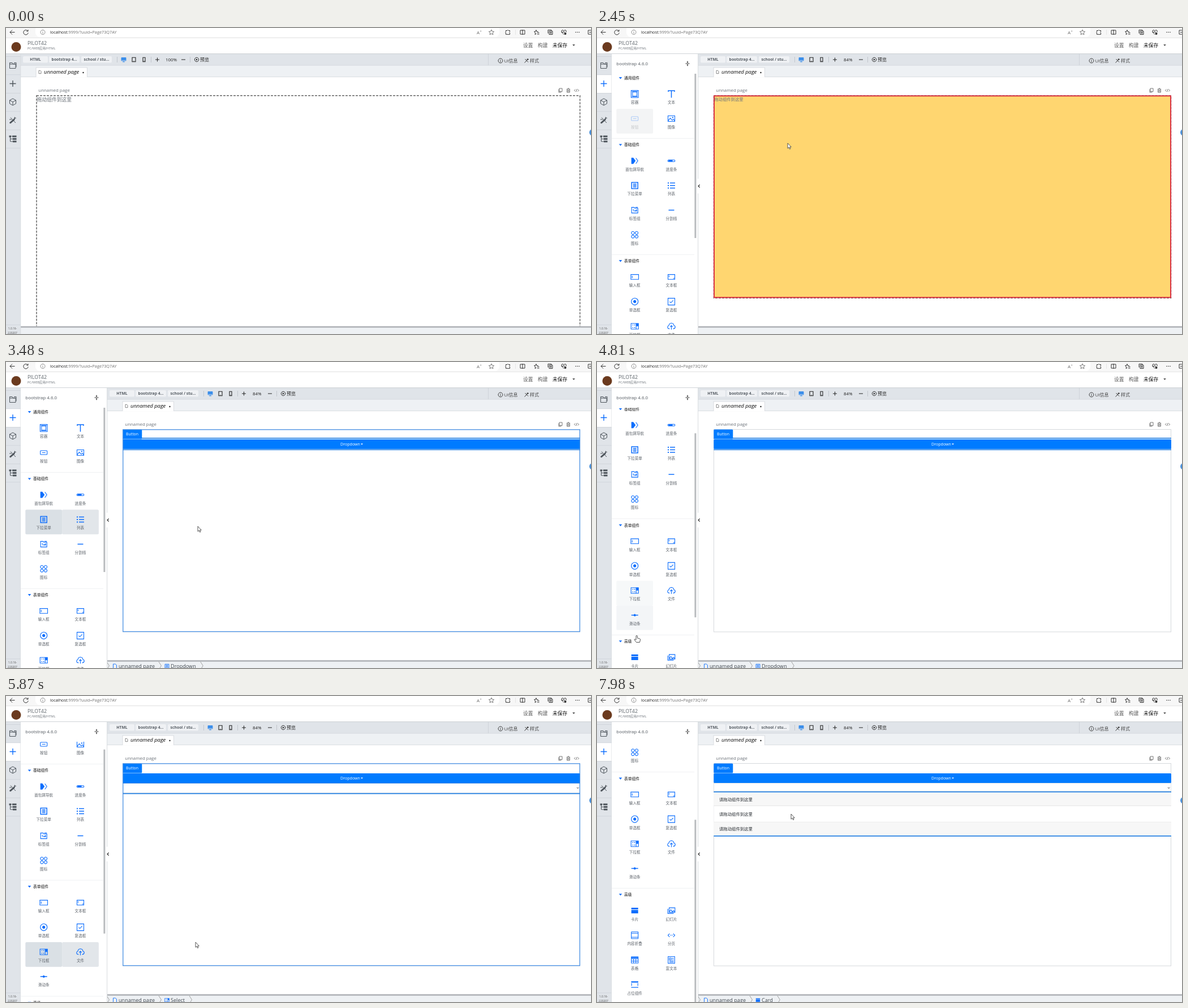
These frames come from a looping animation (1034 px wide and 542 px high, 8000 ms). An HTML page with a canvas:

```html
<!DOCTYPE html>
<html lang="zh-CN">
<head>
<meta charset="utf-8">
<style>
html, body { margin: 0; width: 100%; height: 100%; overflow: hidden; background: #fff; }
canvas { display: block; }
</style>
</head>
<body>
<canvas id="stage" width="1034" height="542"></canvas>
<script>
const c = document.getElementById('stage').getContext('2d');
const LOOP = 8000, OPEN = 1400;
const BLUE = '#0d6efd', BTN = '#007bff', SELECT = '#2f86e4', GREY = '#6b7178', DARK = '#24292e';
const FONT = '"Open Sans", "Noto Sans CJK SC", "Noto Sans CJK", sans-serif';

// Icons: [stroke path, fill path], centred on 0,0
const ICONS = {
  box: ['M-6.3-6.3H6.3V6.3H-6.3ZM-3.8-3.8H3.8V3.8H-3.8Z', 'M-5-5H5V-4H-5ZM-5 4H5V5H-5Z'],
  text: ['M-5.5-4V-6H5.5V-4M0-6V6.5', ''],
  button: ['M-5-3.5H5Q6-3.5 6-2.5V2.5Q6 3.5 5 3.5H-5Q-6 3.5-6 2.5V-2.5Q-6-3.5-5-3.5ZM-3 0H3', ''],
  image: ['M-6-5H6V5H-6ZM-6 4L-2-1L1.5 3L3.5 1L6 4', 'M1.5-3H3.5V-1H1.5Z'],
  crumb: ['M2-5L5.5 0L2 5', 'M-6-5.5H-2.5L1.5 0L-2.5 5.5H-6Z'],
  progress: ['M-5-1.5H5Q6.3-1.5 6.3 0T5 1.5H-5Q-6.3 1.5-6.3 0T-5-1.5', 'M-5-1.5H2V1.5H-5Z'],
  menu: ['M-5.5-5.5H5.5V5.5H-5.5ZM-3-2.5H3M-3 0H3M-3 2.5H3', ''],
  list: ['M-2.5-4.5H6.5M-2.5 0H6.5M-2.5 4.5H6.5', 'M-6.5-5.5H-4.5V-3.5H-6.5ZM-6.5-1H-4.5V1H-6.5ZM-6.5 3.5H-4.5V5.5H-6.5Z'],
  tabs: ['M-5.5-5H-1L0-3.3H5.5V5H-5.5ZM1-5H5.5', 'M-3.7-1.2H-1V-.4H-3.7ZM-2.7-1.2H-1.9V2.5H-2.7ZM-.4.2H1.4V2.5H-.4ZM2-1.2H3.8V2.5H2Z'],
  rule: ['M-5 0H5', ''],
  icons: ['M-.7-3.3A2.6 2.6 0 1 1-.7-3.4ZM5.9-3.3A2.6 2.6 0 1 1 5.9-3.4ZM-.7 3.3A2.6 2.6 0 1 1-.7 3.2ZM5.9 3.3A2.6 2.6 0 1 1 5.9 3.2Z', ''],
  input: ['M-6.8-4.3H6.8V4.3H-6.8ZM-4.5-2V2', ''],
  area: ['M-6-4.3H6V4.3H-6ZM-4-2.3V0', 'M5 1V3.3H2.7Z'],
  radio: ['M6 0A6 6 0 1 1 6-.1Z', 'M2.7 0A2.7 2.7 0 1 1 2.7-.1Z'],
  check: ['M-6-6H6V6H-6ZM-3 0L-1 2.2L3.2-2.2', ''],
  select: ['M-6.5-5H6.5V5H-6.5ZM2.5-5V5M-4.5-2.2H-2.8M-1.5-2.2H1M-4.5 2.2H-2.8M-1.5 2.2H1', 'M2.5-5H6.5V0H2.5Z'],
  upload: ['M-3 4.5H-4Q-7 4-6.6 1Q-6-1-4.5-1.2Q-4-5.3 0-5.5Q4-5.3 4.5-1.2Q7-.7 6.7 2Q6 4.5 3 4.5M0 6V-1M-2.3 1.2L0-1.2L2.3 1.2', ''],
  slider: ['M-6 0H6', 'M2 0A2 2 0 1 1 2-.1Z'],
  card: ['', 'M-6-5H6V-2H-6ZM-6-1H6V5H-6Z'],
  slides: ['M-4-5H6.3V3H-4ZM-4 2L-1-1.5L2 2L4 0L6 2M-6.3-3V5H4', ''],
  fold: ['M-6-6H6M-6 6H6M-6-3.5H6V3.5H-6ZM-6-6V6M6-6V6', ''],
  pages: ['M-3.2-3L-6 0L-3.2 3M3.2-3L6 0L3.2 3', 'M-2.5-.6H-1.3V.6H-2.5ZM-.6-.6H.6V.6H-.6ZM1.3-.6H2.5V.6H1.3Z'],
  table: ['M-6-5.5H6V5.5H-6ZM-6-2H6M-6 2H6M-2-2V5.5M2-2V5.5', 'M-6-5.5H6V-3H-6Z'],
  rich: ['M-5.8-6H5.8V6H-5.8ZM-3.5-3.5H-.5V0H-3.5ZM1-3H4M1-.5H4M-3.5 2H4M-3.5 4H4', ''],
  slot: ['M-6.3-5H6.3M-6.3 5H6.3M-5.5-2.5V2.5M5.5-2.5V2.5', 'M-6-5.5H6V-3.5H-6Z']
};

const GROUPS = [
  ['通用组件', 'box 容器 text 文本 button 按钮 image 图像'],
  ['基础组件', 'crumb 面包屑导航 progress 进度条 menu 下拉菜单 list 列表 tabs 标签组 rule 分割线 icons 图标'],
  ['表单组件', 'input 输入框 area 文本框 radio 单选框 check 复选框 select 下拉框 upload 文件 slider 滑动条'],
  ['高级', 'card 卡片 slides 幻灯片 fold 内容折叠 pages 分页 table 表格 rich 富文本 slot 占位组件']
];
const heads = [], tiles = [];
let nextHead = 88.6;
for (const [title, items] of GROUPS) {
  heads.push({ title, y: nextHead });
  const words = items.split(' '), count = words.length / 2;
  for (let i = 0; i < count; i++) {
    tiles.push({ icon: words[2 * i], label: words[2 * i + 1], x: 34.3 + 64.8 * (i % 2), y: nextHead + 11 + 43.67 * (i >> 1) });
  }
  nextHead += Math.ceil(count / 2) * 43.67 + 31;
}

const DRAGS = [
  { icon: 'button', next: 'image', name: 'Button', from: 2200, to: 2540, stale: 150, lines: [119.5, 137] },
  { icon: 'menu', next: 'list', name: 'Dropdown', from: 3030, to: 3440, stale: 160, lines: [135, 155.3] },
  { icon: 'select', next: 'upload', name: 'Select', from: 5560, to: 5830, stale: 160, lines: [154, 172.8] },
  { icon: 'card', next: 'slides', name: 'Card', from: 7620, to: 7900, stale: 0, lines: [169.8, 248] }
];

const POINTER = [[40, 420, 330], [450, 110, 210], [820, 22, 110], [870, 22, 110], [1160, 11, 97], [1400, 11, 97],
  [2120, 66, 165], [2200, 66, 165], [2420, 337, 204], [2570, 337, 204], [2960, 66, 285], [3030, 66, 285],
  [3400, 339, 291], [3540, 339, 291], [3810, 70, 345], [4500, 70, 485], [4880, 70, 485], [5310, 66, 455],
  [5560, 66, 455], [5790, 335, 436], [5930, 335, 436], [6340, 85, 440], [6500, 77, 441], [6900, 77, 441],
  [7150, 64, 386], [7220, 64, 386], [7450, 60, 381], [7620, 60, 381], [7880, 343, 209]];
const SCROLL = [[4560, 0], [4810, 123.5], [4900, 123.5], [5200, 75], [6450, 75], [6750, 266.5]];

function track(keys, t) {
  const i = keys.findIndex(k => k[0] > t);
  if (i === 0) return keys[0].slice(1);
  if (i < 0) return keys[keys.length - 1].slice(1);
  const a = keys[i - 1], b = keys[i], u = (t - a[0]) / (b[0] - a[0]), e = u * u * (3 - 2 * u);
  return a.slice(1).map((v, k) => v + (b[k + 1] - v) * e);
}

function rect(x, y, w, h, color) { c.fillStyle = color; c.fillRect(x, y, w, h); }
function round(x, y, w, h, r, color) { c.fillStyle = color; c.beginPath(); c.roundRect(x, y, w, h, r); c.fill(); }
function frame(x, y, w, h, color, lw) { c.strokeStyle = color; c.lineWidth = lw; c.strokeRect(x, y, w, h); }
function disc(x, y, r, color) { c.fillStyle = color; c.beginPath(); c.arc(x, y, r, 0, 7); c.fill(); }
function text(s, x, y, size, color, style = '', align = 'left') {
  c.font = `${style} ${size}px ${FONT}`;
  c.fillStyle = color;
  c.textAlign = align;
  c.fillText(s, x, y + size * 0.36);
}
function draw(x, y, stroke, fill, color, lw = 1, scale = 1) {
  c.save();
  c.translate(x, y);
  c.scale(scale, scale);
  c.lineWidth = lw;
  c.strokeStyle = c.fillStyle = color;
  if (stroke) c.stroke(new Path2D(stroke));
  if (fill) c.fill(new Path2D(fill));
  c.restore();
}
function icon(name, x, y, scale = 1) {
  draw(x, y, ...ICONS[name], BLUE, /text|list|rule|menu|slider/.test(name) ? 1.5 : 1.1, scale);
}

function drawBrowser() {
  rect(0, 0, 1034, 17.5, '#f7f7f7');
  round(52, -6, 820, 22, 8, '#fff');
  draw(11, 7.5, 'M4.5 0H-4M0-4L-4 0L0 4', '', '#333');
  draw(35, 7.5, 'M3.6-2A4.2 4.2 0 1 0 4.2 1M4-4.5V-1.7H1.2', '', '#333');
  draw(65, 7.5, 'M4 0A4 4 0 1 1 4-.1ZM0-.8V2.3M0-2.3V-1.6', '', '#777', 0.8);
  text('localhost', 78, 7.5, 7.3, '#222');
  const host = c.measureText('localhost').width;
  text(':9999/?uuid=Page73Q7AY', 78 + host, 7.5, 7.3, '#707070');
  text('A', 832, 8, 8, '#666');
  text('»', 838, 5, 5, '#666');
  draw(858, 7.5, 'M0-4.5L1.4-1.5L4.6-1.2L2.2 1L2.9 4.2L0 2.5L-2.9 4.2L-2.2 1L-4.6-1.2L-1.4-1.5Z', '', '#555', 0.8);
  draw(887, 7.5, 'M-3.5-3H-1Q0-5 1-3H3.5V-1Q1.5 0 3.5 1V3.8H-3.5V1.5Q-5 0-3.5-1Z', '', '#333');
  rect(900, 3, 0.7, 9, '#ddd');
  draw(913, 7.5, 'M-4-3.5H4V3.5H-4ZM0-4.5V4.5', '', '#333');
  draw(938, 7.5, 'M-1-4L0-1.2L3-1M-1-4L-2-1.2L-4.5-1L-2.5 1L-3 4L-.5 2.5M1 1H4.5M1 3.5H4.5', '', '#333');
  draw(962, 7.5, 'M-4 2V-4H2V-2M-2-2H4V4H-2ZM1-1V3M-1 1H3', '', '#333');
  draw(986, 7.5, 'M0 4L-4 0Q-5-4-2-4L0-2.5L2-4Q5-4 4 0M-4 0H-1L0-1.5L1.5 1', 'M4.5 2.5A2 2 0 1 1 4.5 2.4Z', '#333');
  for (let i = -1; i < 2; i++) disc(1010 + i * 3, 7.5, 0.8, '#333');
  draw(1032, 7.5, 'M4-3.5H-3V3.5H4M-1 0H4', '', '#333');

  rect(0, 17, 1034, 1, '#e6e6e6');
  rect(0, 18, 1034, 27.5, '#fff');
  disc(18, 33.5, 8.5, '#6b3a1e');
  text('PILOT42', 38, 27, 8.9, '#5d646b');
  text('PC/WEB应用/HTML', 38, 35.5, 5.6, '#6b7178');
  text('设置', 914, 31, 8.7, '#555');
  text('构建', 940, 31, 8.7, '#555');
  text('未保存', 966, 31, 8.7, '#111', '500');
  draw(1003.5, 30.5, '', 'M-2.3-1.2H2.3L0 1.3Z', '#333');
}

function drawRail(open) {
  rect(0, 46, 26, 496, '#e0e4e9');
  if (open) rect(0, 83, 26, 32, '#fff');
  for (const y of [50, 82.4, 115, 147.5, 180, 212.5, 525.5]) rect(0, y, 26, 0.8, '#ced3d9');
  rect(25.5, 46, 0.7, 496, '#d3d7dc');
  const ink = '#4d545b';
  draw(12, 66.5, 'M-5.5 5V-5H-1L0-3H5V5ZM-5.5-2.5H5M2-5H6V3', '', ink);
  draw(12, 98.5, 'M-5.5 0H5.5M0-5.5V5.5', '', open ? BLUE : ink, 1.4);
  draw(12, 131, 'M0-6L5.5-3V3L0 6L-5.5 3V-3ZM-5.5-3L0 0L5.5-3M0 0V6', '', ink);
  draw(12, 163.5, 'M-5.5 5.5L4-4M-4-5L5 4.5', 'M-6-2H-2V-1H-6ZM3-6H4V-2H3ZM2-4.5H6V-3.5H2ZM-6 4L2-3L4-1L-4 6Z', ink);
  draw(12, 196.5, 'M-4.5-4V4.5H0M-4.5 0H0', 'M-6.5-6H-2.5V-3H-6.5ZM-1-6H6.5V-3H-1ZM0-1.5H6.5V1.5H0ZM0 3H6.5V6H0Z', ink);
  text('1.0.16-', 11.5, 532.5, 4.9, '#555', '', 'center');
  text('220207', 11.5, 540, 4.9, '#555', '', 'center');
}

function drawToolbar(dx) {
  rect(26 + dx, 46, 1008 - dx, 20, '#e0e4e9');
  rect(26 + dx, 66, 1008 - dx, 21, '#eef1f4');
  rect(26 + dx, 65.7, 1008 - dx, 0.8, '#d2d6db');
  rect(26 + dx, 86.3, 1008 - dx, 0.8, '#d5d9de');
  rect(0, 45, 1034, 1.2, '#d0d4d8');
  rect(852, 46, 0.8, 20, '#cbd0d6');
  draw(874, 58, 'M4 0A4 4 0 1 1 4-.1ZM0-.8V2.3M0-2.3V-1.5', '', '#333', 0.9);
  text('UI信息', 880.5, 58, 8, '#444');
  draw(920, 58, 'M-3.5 3.5L2.5-2.5M-2.5-3L3 2.5', 'M1.5-4H2.5V-1H1.5ZM.5-3H4V-2H.5Z', '#333');
  text('样式', 926, 58, 8, '#444');

  c.save();
  c.translate(dx, 0);
  [['HTML', 30, 44], ['bootstrap 4...', 76, 54], ['school / stu...', 133, 54]].forEach(([s, x, w]) => {
    round(x, 50, w, 11.5, 2, '#eff1f4');
    text(s, x + w / 2, 55.5, 6.8, '#555c63', 'bold', 'center');
  });
  for (const x of [196, 256, 325]) rect(x, 51, 0.8, 10, '#b9bfc6');
  draw(208, 56, 'M-4-3.5H4V2H-4ZM-2 4H2M0 2V4', 'M-4-3.5H4V1H-4Z', '#3b8eea', 0.9);
  draw(226, 56, 'M-3-3.7H3V3.7H-3ZM-.5 2.5H.5', '', '#222', 1.1);
  draw(244, 56, 'M-2-3.7H2V3.7H-2ZM-.5 2.5H.5', '', '#222', 1.1);
  draw(267.5, 56, 'M-3.5 0H3.5M0-3.5V3.5', '', '#222');
  text(dx ? '84%' : '100%', dx ? 283 : 282, 56, 7.9, '#222');
  draw(313.5, 56, 'M-3.5 0H3.5', '', '#222');
  draw(337, 56, 'M3.7 0A3.7 3.7 0 1 1 3.7-.1Z', 'M-1.2-1.8L2 0L-1.2 1.8Z', '#222', 0.9);
  text('预览', 343, 56, 8, '#222');

  round(53, 70, 90.5, 17, [2, 2, 0, 0], '#fff');
  c.strokeStyle = '#d2d6db';
  c.lineWidth = 0.8;
  c.stroke(new Path2D('M53 87V70H143.5V87'));
  draw(60, 78, 'M-2-2.7H.7L2-1.3V2.7H-2Z', '', '#555', 0.7);
  text('unnamed page', 67, 78, 9.4, '#111', 'italic');
  disc(136.5, 79, 1.2, '#222');
  text('unnamed page', 57.3, 109.7, 7.9, GREY);
  c.restore();

  draw(980, 110.5, 'M-2-3.5H3V2H-2ZM-3-2V3.5H1.5', '', '#555', 0.8);
  draw(994, 110.5, 'M-3-2.3H3M-1-3.5H1M-2.3-2V3.5H2.3V-2M-.8-.5V2M.8-.5V2', '', '#555', 0.9);
  draw(1008.5, 110.5, 'M-2-2L-4 0L-2 2M2-2L4 0L2 2M.7-2.5L-.7 2.5', '', '#555', 0.8);
}

function drawPage(t, open, pointer, drag, placed) {
  const x = open ? 206.5 : 54, w = 1014.5 - x, h = open ? 358.5 : 427, y = 119.5;
  const inside = t >= 40 && pointer[0] > x && pointer[1] > y;
  const over = drag && inside;
  c.save();
  c.beginPath();
  c.rect(26, 87, 1008, 441);
  c.clip();
  if (over) rect(x, y, w, h, '#ffd670');
  if (!placed) {
    text('拖动组件到这里', x + 0.7, open ? 126 : 127.3, open ? 7.35 : 8.75, GREY);
    c.setLineDash([4, 2]);
    frame(x, y + 0.3, w, h, '#666', 1.5);
    c.setLineDash([]);
  } else {
    frame(x, y, w, h, '#d5d8dc', 1);
    drawParts(placed, over);
  }
  if (over) frame(x + 0.5, y + 0.8, w - 1, h - 1.5, '#dc3545', 2);
  else if (inside && placed < 4) frame(x + 0.3, y + 0.3, w - 0.6, h - 0.8, '#4b93e6', 1.3);
  c.restore();
}

function drawParts(placed, over) {
  const left = 206.3, width = 808.7;
  if (placed > 2) {
    const bottom = placed > 3 ? 168.5 : 171.5;
    round(left, 154, width, bottom - 154, 2, '#fff');
    frame(left + 0.3, 154.5, width - 0.6, bottom - 154.5, '#d5dae0', 0.7);
    draw(1010.7, 162.7, 'M-1.7-.8L0 1L1.7-.8', '', '#333');
  }
  if (placed > 3) {
    rect(left, 171, width, 76.5, '#fff');
    rect(left, 171, width, 23.5, '#f7f7f7');
    rect(left, 223, width, 24.5, '#f7f7f7');
    rect(left, 194.2, width, 0.7, '#dfdfdf');
    rect(left, 222.8, width, 0.7, '#e8e8e8');
    for (const y of [183.3, 209.5, 235.8]) text('请拖动组件到这里', 216, y, 7.35, DARK);
  }
  if (!over) {
    for (const y of DRAGS[placed - 1].lines) rect(left, y - 0.9, width, 1.8, SELECT);
  }
  round(left, 119.5, 34, 17, 1.5, BTN);
  text('Button', 223, 128, 6.9, '#fff', '', 'center');
  if (placed > 1) {
    round(left, 137, width, 17, 1.5, BTN);
    text('Dropdown', 608.5, 145.5, 7.1, '#fff', '', 'center');
    draw(629, 145.5, '', 'M-2-1H2L0 1.2Z', '#fff');
  }
}

function drawFooter(dx, placed) {
  rect(26 + dx, 528, 1008 - dx, 3, '#b8bbbf');
  rect(26 + dx, 531, 1008 - dx, 11, '#eef1f4');
  if (!placed) return;
  const part = DRAGS[placed - 1];
  const chevron = x => draw(x, 538, 'M-2-7L2.5 0L-2 7', '', '#999', 0.9);
  chevron(180);
  draw(192.5, 539, 'M-3-4H1L3-2V4H-3Z', '', BLUE, 0.9);
  text('unnamed page', 199, 538.7, 9.1, '#444b52');
  chevron(272);
  icon(part.icon, 284.5, 538.7, 0.62);
  text(part.name, 291, 538.7, 9.1, '#444b52');
  chevron(291 + c.measureText(part.name).width + 10);
}

function hovered(tile, t) {
  if (t < OPEN || DRAGS.some(d => t >= d.from && t < d.to)) return false;
  const [x, y] = track(POINTER, t), top = tile.y - track(SCROLL, t)[0];
  return x >= tile.x && x < tile.x + 64.8 && y >= Math.max(top, 81) && y < top + 43.67;
}

function tileGlow(tile, t) {
  let sum = 0;
  for (let i = 0; i < 10; i++) sum += hovered(tile, t - i * 18);
  return sum / 10;
}

function drawPanel(t, drag) {
  const scroll = track(SCROLL, t)[0];
  const dropped = DRAGS.find(d => t >= d.to && t < d.to + d.stale);
  rect(26, 46, 153, 496, '#fff');
  text('bootstrap 4.6.0', 34.3, 63, 7.9, '#4d545b');
  draw(160, 63, 'M-3.5 0H3.5M0-4.5V-1.5M0 1.5V4.5', 'M-1.5-3H1.5L0-1.2ZM-1.5 3H1.5L0 1.2Z', '#333');
  c.save();
  c.beginPath();
  c.rect(26, 81, 152, 461);
  c.clip();
  rect(172.4, 46 + scroll * 0.65, 3, 326, '#b9bcbf');
  c.translate(0, -scroll);
  heads.forEach(({ title, y }, i) => {
    if (i) rect(26, y - 11.8, 146, 0.8, '#eceef0');
    draw(41.5, y, '', 'M-2.8-1.5H2.8L0 1.8Z', BLUE);
    text(title, 48, y, 6.75, '#111', '500');
  });
  for (const tile of tiles) {
    const dragged = drag && drag.icon === tile.icon;
    const glow = tileGlow(tile, t);
    let back = `rgba(226,230,234,${glow})`;
    if (dragged) back = '#f3f4f5';
    else if (dropped && dropped.icon === tile.icon) back = '#dae0e5';
    else if (dropped && dropped.next === tile.icon) back = '#e2e6ea';
    round(tile.x, tile.y, 64.8, 43.7, 2, back);
    c.globalAlpha = dragged ? 0.3 : 1;
    const mid = tile.x + 32.4;
    icon(tile.icon, mid, tile.y + 17.3);
    text(tile.label, mid, tile.y + 32.4, 6.6, '#5b6168', '', 'center');
    c.globalAlpha = 1;
  }
  c.restore();
  rect(178.3, 46, 0.8, 496, '#cfd3d8');
  round(178, 267, 6.5, 26, [0, 3, 3, 0], '#fff');
  draw(180.3, 280, 'M1.3-2.5L-1.3 0L1.3 2.5', '', '#222', 1.1);
}

function drawPointer([x, y], hand) {
  const shape = new Path2D(hand
    ? 'M-1 0Q.3-1 1.3 0V4L5.5 5Q6.8 5.5 6.5 7L5.5 11.5H-.5L-4 7Q-4 5.5-2.7 6L-1 7.3Z'
    : 'M0 0V9.2L2.1 7.3L3.6 10.5L5 9.8L3.6 6.8H6.3Z');
  c.save();
  c.translate(x, y);
  c.fillStyle = '#fff';
  c.fill(shape);
  c.strokeStyle = '#444';
  c.lineWidth = 0.9;
  c.stroke(shape);
  c.restore();
}

function render(t) {
  const open = t >= OPEN, dx = open ? 153 : 0;
  const pointer = track(POINTER, t);
  const drag = DRAGS.find(d => t >= d.from && t < d.to);
  const placed = DRAGS.filter(d => t >= d.to).length;
  rect(0, 0, 1034, 542, '#fff');
  drawBrowser();
  drawToolbar(dx);
  drawPage(t, open, pointer, drag, placed);
  drawFooter(dx, placed);
  drawRail(open);
  if (open) drawPanel(t, drag);
  disc(1037, 185, 6, '#4a90d9');
  if (t >= 40) drawPointer(pointer, !drag && pointer[0] < (open ? 172 : 26));
}

const start = performance.now();
function tick(now) {
  render(Math.max(0, now - start) % LOOP);
  requestAnimationFrame(tick);
}
render(0);
requestAnimationFrame(tick);
</script>
</body>
</html>
```
